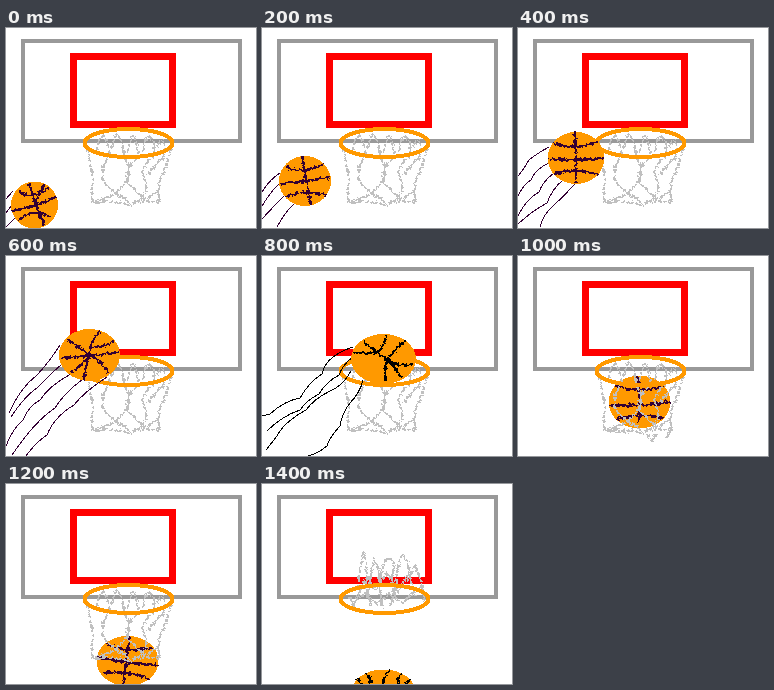
Animation of 250 by 200 pixels, one loop 1600 ms. Source, as an HTML page:

```html
<!DOCTYPE html>
<html lang="en">
<head>
<meta charset="utf-8">
<title>Basketball shot</title>
<style>
  html, body { margin: 0; width: 100%; height: 100%; overflow: hidden; background: #fff; }
  svg { display: block; width: 250px; height: 200px; shape-rendering: crispEdges; }
  path, .line { fill: none; }
  .ball { fill: #f90; }
  .seam { stroke: #303; stroke-width: 2.4; filter: url(#rough); }
  .trail { stroke: #303; stroke-width: 1; }
  .dark .seam, .dark .trail { stroke: #000; }
  .net { stroke: #c0c0c0; stroke-width: 2; stroke-dasharray: 4 .7; filter: url(#rough); }

  /* Each pose shows for one eighth of the loop, in slot --i */
  .pose {
    opacity: 0;
    animation: pose 1600ms step-end infinite;
    animation-delay: calc((var(--i) - 8) * 200ms);
  }
  .hanging { animation: hanging 1600ms step-end infinite; }
  @keyframes pose { 0% { opacity: 1; } 12.5%, 100% { opacity: 0; } }
  @keyframes hanging { 0% { opacity: 1; } 87.5%, 100% { opacity: 0; } }
</style>
</head>
<body>
<svg viewBox="0 0 250 200">
  <defs>
    <filter id="rough" filterUnits="userSpaceOnUse" x="0" y="0" width="250" height="200" color-interpolation-filters="sRGB">
      <feTurbulence type="fractalNoise" baseFrequency=".35" numOctaves="2" seed="4"/>
      <feDisplacementMap in="SourceGraphic" scale="5" xChannelSelector="R" yChannelSelector="G"/>
    </filter>
  </defs>

  <!-- Backboard -->
  <rect class="line" x="17" y="13" width="217" height="100" stroke="#999" stroke-width="4"/>
  <rect class="line" x="67.5" y="28.5" width="99" height="68" stroke="#f00" stroke-width="7"/>

  <!-- Ball inside and below the net -->
  <g class="pose" style="--i:5">
    <ellipse class="ball" cx="121.5" cy="146" rx="31" ry="26.5"/>
    <path class="seam" d="M120 120Q122 145 121 167M92 149Q122 151 152 146M98 130Q120 137 146 131M98 163Q121 157 145 162"/>
  </g>
  <g class="pose" style="--i:6">
    <ellipse class="ball" cx="121.5" cy="177" rx="31" ry="25"/>
    <path class="seam" d="M124 153Q120 177 117 201M92 173Q122 180 152 181M101 160Q120 169 147 164M97 189Q118 186 142 194"/>
  </g>
  <g class="pose dark" style="--i:7">
    <ellipse class="ball" cx="121.5" cy="207" rx="31.5" ry="21.5"/>
    <path class="seam" d="M127 187Q122 191 121 201M104 190Q110 194 108 201M140 190Q134 195 137 201M95 195L101 201M148 195L143 201"/>
  </g>

  <!-- Net -->
  <g class="hanging">
    <path class="net" d="M82 121Q84 138 87 150Q86 165 86 174Q105 172 123 177Q135 171 154 175M165 121Q160 140 156 148Q150 162 154 175"/>
    <path class="net" d="M91 122Q93 107 97 108Q103 115 103 128Q95 139 97 151Q104 164 117 169L125 177"/>
    <path class="net" d="M106 122Q108 106 112 107Q118 116 118 130Q125 140 122 151Q114 164 103 169L88 174"/>
    <path class="net" d="M122 124Q124 107 128 108Q133 119 131 131Q118 140 121 153Q130 165 139 171L151 164"/>
    <path class="net" d="M137 123Q139 108 144 108Q151 116 147 130Q134 138 138 150Q143 160 136 170L125 178"/>
    <path class="net" d="M151 121Q153 110 157 113Q161 120 157 130Q148 139 141 147"/>
  </g>
  <path class="pose net" style="--i:5" d="M90 174Q105 178 116 174M129 178L134 185L139 176M148 182L154 174"/>
  <g class="pose" style="--i:7">
    <path class="net" d="M88 113L91 122L97 109Q96 86 102 70Q106 84 104 103L109 122M106 116Q107 92 112 76Q118 83 117 98L121 124"/>
    <path class="net" d="M119 119Q117 97 122 77Q131 70 132 84Q128 95 132 111L128 122M133 112Q134 86 140 71Q147 74 147 91L153 112M145 98L153 81L158 94L163 117"/>
    <path class="net" d="M96 113L105 92L113 106L125 89L136 108L145 91M92 119L103 109L115 120L126 110L141 119L151 109"/>
  </g>

  <ellipse class="line" cx="122.5" cy="115" rx="44" ry="14" stroke="#f90" stroke-width="4"/>

  <!-- Ball on its way up -->
  <g class="pose" style="--i:0">
    <path class="trail" d="M0 171L7 163M0 185L6 177M0 199L10 189"/>
    <ellipse class="ball" cx="28.5" cy="177" rx="23.5" ry="23.5"/>
    <path class="seam" d="M23 155Q29 177 38 197M6 183Q29 179 50 169M13 163Q23 173 43 160M12 193Q25 179 45 189M38 157Q31 165 30 178"/>
  </g>
  <g class="pose" style="--i:1">
    <path class="trail" d="M18 145Q8 151 0 164M17 156Q9 163 0 178M22 168Q12 178 0 191M32 176Q23 184 15 199"/>
    <ellipse class="ball" cx="43" cy="153" rx="26" ry="25"/>
    <path class="seam" d="M40 128Q44 153 49 177M17 156Q43 154 68 149M23 139Q41 147 62 136M24 169Q41 161 64 167"/>
  </g>
  <g class="pose" style="--i:2">
    <path class="trail" d="M31 119Q18 126 11 132Q6 141 0 148M31 135Q17 141 13 152Q5 157 0 168M36 145Q25 153 21 164Q8 171 0 188M45 152Q34 161 29 175Q14 183 0 196M57 156Q45 169 34 179Q25 187 22 199"/>
    <ellipse class="ball" cx="58" cy="130" rx="28.5" ry="26"/>
    <path class="seam" d="M57 104Q59 130 58 156M31 131Q57 133 86 130M35 115Q57 123 80 114M36 146Q57 139 80 147"/>
  </g>
  <g class="pose" style="--i:3">
    <path class="trail" d="M54 89Q44 105 31 119Q14 132 3 157M56 108Q43 119 32 131Q17 142 5 161M65 118Q43 130 34 144Q22 151 17 164Q7 172 0 190M77 123Q58 137 49 152Q29 165 6 199M101 121Q78 136 68 149Q48 161 41 179Q29 187 20 200"/>
    <ellipse class="ball" cx="83.5" cy="99" rx="30.5" ry="26"/>
    <path class="seam" d="M94 75Q83 87 84 99Q79 110 78 124M54 102Q82 101 113 96M61 83Q76 93 84 99M65 116Q78 108 84 99Q96 106 102 117M86 91Q99 91 108 85"/>
  </g>
  <g class="pose dark" style="--i:4">
    <path class="trail" d="M91 91Q81 94 71 101Q62 108 60 118Q47 126 38 142Q22 145 8 158L0 160M91 101Q81 108 77 119Q64 126 57 138Q45 144 38 154Q20 160 5 175M89 115Q81 130 68 135Q52 143 44 154Q22 166 15 180L4 194M101 124Q98 137 88 147Q80 157 78 170Q67 182 65 190Q55 198 46 200"/>
    <ellipse class="ball" cx="121.5" cy="103" rx="32.5" ry="25"/>
    <path class="seam" d="M100 84Q114 96 125 104Q134 111 139 122M144 84Q133 93 125 104Q122 115 124 125M91 96Q107 98 116 96Q124 89 124 79M125 104Q139 112 151 108"/>
  </g>
</svg>
</body>
</html>
```
